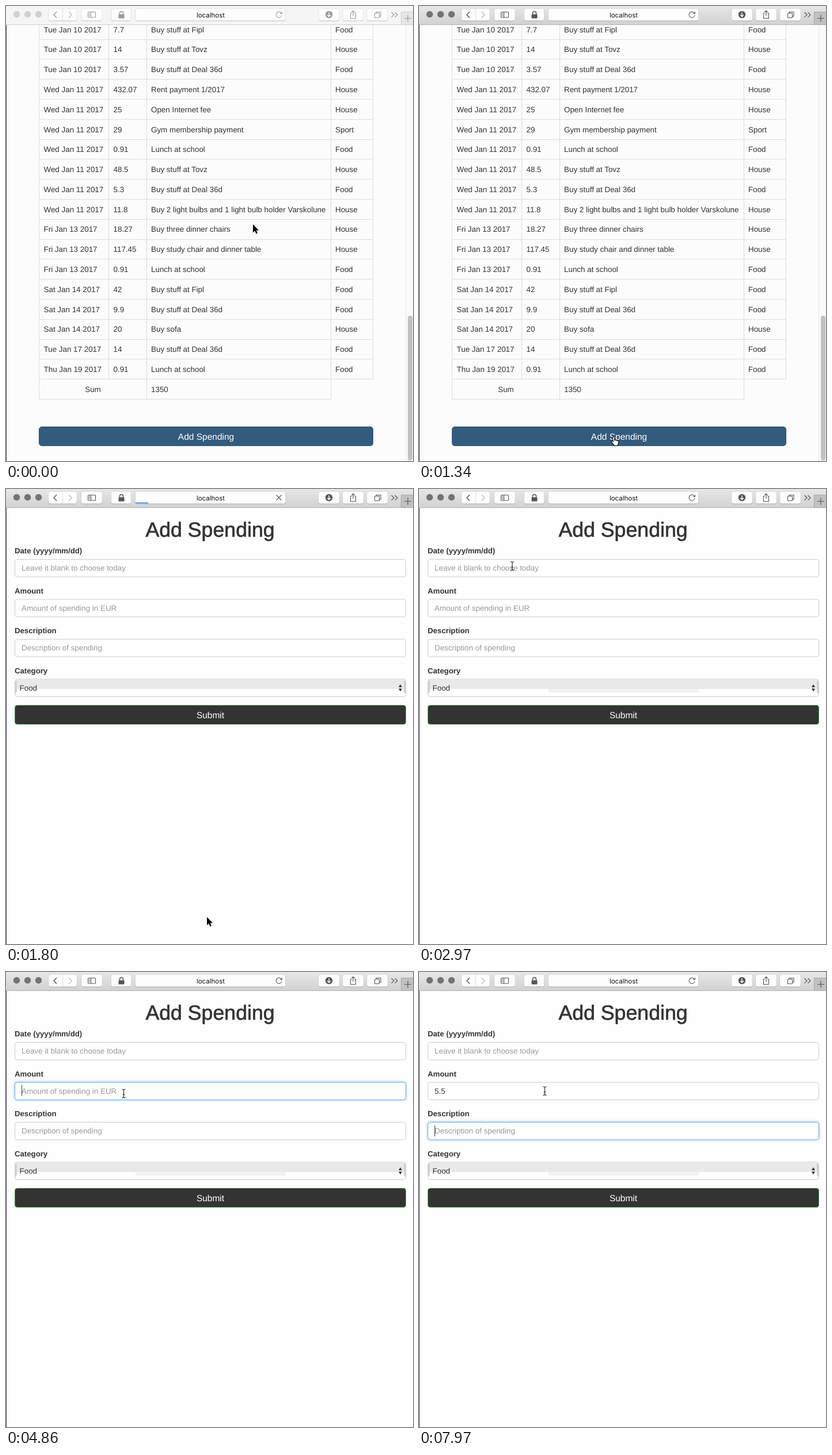
An HTML page that plays this animation: 707x792 px, repeating every 8 s.

```html
<!DOCTYPE html>
<html lang="en">
<head>
<meta charset="utf-8">
<title>Add Spending</title>
<style>
  html, body { margin: 0; width: 100%; height: 100%; overflow: hidden; background: #fefefe; }
  svg { display: block; }
  text { font: 13.4px "Liberation Sans", Arial, sans-serif; fill: #333; text-rendering: geometricPrecision; white-space: pre; }
  .mid { text-anchor: middle; }
  .label { font-weight: bold; font-size: 13.2px; }
  .hint { fill: #999; }
  .big { font-size: 15.5px; fill: #fff; }
  .title { font-size: 35.7px; stroke: #333; stroke-width: .7; }
  .url { font: 11.5px Inter, Roboto, sans-serif; fill: #111; }
  .icon { fill: none; stroke: currentColor; stroke-width: 1.1; }
  .solid { fill: currentColor; stroke: none; }
</style>
</head>
<body>
<svg id="stage" width="707" height="792" viewBox="0 0 707 792">
  <defs>
    <linearGradient id="bar" x2="0" y2="1"><stop stop-color="#e7e7e7"/><stop offset="1" stop-color="#d1d1d1"/></linearGradient>
    <filter id="blur" x="-5%" width="110%" y="-60%" height="220%"><feGaussianBlur stdDeviation="2.6"/></filter>
  </defs>
  <g id="tablePage"></g>
  <g id="formPage"></g>
  <rect y="33" width="1" height="759" fill="#3a4152"/>
  <g id="toolbar"></g>
  <g id="pointer">
    <path id="arrow" d="M0 0V14.2L3.3 11.2L5.6 16.6L8 15.6L5.7 10.4H10Z" fill="#000" stroke="#fff" stroke-width="1" paint-order="stroke"/>
    <path id="hand" d="M-1.6 1.2C-1.6 -.9 1 -.9 1.2 1L1.8 6C2.4 4.6 4.2 4.8 4.3 6.2C5 5.2 6.5 5.6 6.6 7C7.6 6.2 8.8 6.8 8.8 8.2C8.9 11 8.2 12 7.4 13.4V15.4H.6V13.8C-1 12.4 -2.6 10.4 -3.8 8.6C-4.4 7.2 -3 6.6 -1.9 7.4L-.8 8.4Z" fill="#fff" stroke="#111" stroke-width="1.1"/>
    <g id="beam" fill="none">
      <path id="beamLine" d="M-3 -7.5Q0 -7.5 0 -5.5Q0 -7.5 3 -7.5M0 -6V6M-3 7.5Q0 7.5 0 5.5Q0 7.5 3 7.5M-2 2H2" stroke="#222" stroke-width="1.1"/>
    </g>
  </g>
</svg>
<script>
const LOOP = 8000;
const $ = id => document.getElementById(id);
const rect = (x, y, w, h, attrs) => `<rect x="${x}" y="${y}" width="${w}" height="${h}" ${attrs}/>`;
const text = (x, y, str, cls = '', id = '') => `<text x="${x}" y="${y}" class="${cls}" id="${id}">${str}</text>`;
const path = (d, attrs) => `<path d="${d}" ${attrs}/>`;

const deal = 'Buy stuff at Deal 36d', lunch = 'Lunch at school';
const spendings = [
  ['Tue Jan 10', '7.7', 'Buy stuff at Fipl', 'Food'],
  ['Tue Jan 10', '14', 'Buy stuff at Tovz', 'House'],
  ['Tue Jan 10', '3.57', deal, 'Food'],
  ['Wed Jan 11', '432.07', 'Rent payment 1/2017', 'House'],
  ['Wed Jan 11', '25', 'Open Internet fee', 'House'],
  ['Wed Jan 11', '29', 'Gym membership payment', 'Sport'],
  ['Wed Jan 11', '0.91', lunch, 'Food'],
  ['Wed Jan 11', '48.5', 'Buy stuff at Tovz', 'House'],
  ['Wed Jan 11', '5.3', deal, 'Food'],
  ['Wed Jan 11', '11.8', 'Buy 2 light bulbs and 1 light bulb holder Varskolune', 'House'],
  ['Fri Jan 13', '18.27', 'Buy three dinner chairs', 'House'],
  ['Fri Jan 13', '117.45', 'Buy study chair and dinner table', 'House'],
  ['Fri Jan 13', '0.91', lunch, 'Food'],
  ['Sat Jan 14', '42', 'Buy stuff at Fipl', 'Food'],
  ['Sat Jan 14', '9.9', deal, 'Food'],
  ['Sat Jan 14', '20', 'Buy sofa', 'House'],
  ['Tue Jan 17', '14', deal, 'Food'],
  ['Thu Jan 19', '0.91', lunch, 'Food']
];

function buildTable() {
  const columns = [65.5, 186.5, 252, 572];
  let grid = 'M57.5 33V684.5M178.5 33V649.5M244.5 33V684.5M564.5 33V684.5M637.5 33V649.5M57 684.5H565';
  let cells = '';
  spendings.forEach(([day, ...rest], i) => {
    grid += `M57 ${Math.floor(58 + 34.8 * i) + .5}H638`;
    [day + ' 2017', ...rest].forEach((str, c) => cells += text(columns[c], 45.6 + 34.78 * i, str));
  });
  $('tablePage').innerHTML =
    rect(0, 33, 707, 759, 'fill="#fcfcfc"') +
    path(grid, 'fill="none" stroke="#ddd"') + cells +
    text(151, 671.7, 'Sum', 'mid') + text(252, 671.7, '1350') +
    rect(57.5, 732.5, 580, 33, 'rx="4.5" id="addButton" stroke="#2b557a"') +
    text(347.5, 754.5, 'Add Spending', 'mid big') +
    rect(694.5, 33, 13, 759, 'fill="#fafafa" stroke="#e6e6e6"') +
    rect(698, 539, 8, 252, 'rx="4" fill="#c1c1c1"');
}

function buildForm() {
  const field = (id, y, label, hint) =>
    text(15, y - 10, label, 'label') +
    rect(15, y, 680, 31, `rx="4" fill="#66afe9" filter="url(#blur)" id="${id}Glow"`) +
    rect(15.5, y + .5, 679, 30.5, `rx="4" fill="#fff" id="${id}Box" stroke="#ccc"`) +
    text(27, y + 20, hint, 'hint', id + 'Text');
  $('formPage').innerHTML =
    rect(0, 33, 707, 759, 'fill="#fefefe"') +
    text(354.5, 83, 'Add Spending', 'mid title') +
    field('date', 122, 'Date (yyyy/mm/dd)', 'Leave it blank to choose today') +
    field('amount', 191.5, 'Amount', 'Amount of spending in EUR') +
    field('description', 261, 'Description', 'Description of spending') +
    text(15, 320.7, 'Category', 'label') +
    rect(15.5, 331, 679, 30.5, 'rx="4" fill="#fff" stroke="#ccc"') +
    rect(16, 331.5, 678, 16.5, 'rx="3" fill="#e9e9e9"') +
    path('M16 335V357L19 353V333ZM694 335V357L691 353V333Z', 'fill="#d2d2d2"') +
    rect(225, 348, 261, 6.5, 'fill="#f2f2f2" id="band"') +
    text(23.5, 351, 'Food') +
    path('M682 345L685 340L688 345ZM682 347.5L685 352.5L688 347.5Z', 'fill="#333"') +
    rect(15.5, 376.5, 679, 33, 'rx="4" fill="#333" stroke="#439a43"') +
    text(355, 399, 'Submit', 'mid big') +
    rect(27, 197, 1, 19, 'fill="#333" id="caret"');
}

function buildToolbar() {
  const buttons = [[74, 49], [131, 36], [182.5, 35], [224.5, 261], [543, 36], [585, 36], [627, 36]];
  const lights = [18.5, 37.5, 56.5].map(x => `<circle cx="${x}" cy="14.5" r="5.7" class="light"/>`).join('');
  $('toolbar').innerHTML =
    rect(0, 0, 707, 33, 'id="barFill"') + rect(0, 32, 707, 1, 'id="barEdge"') + lights +
    buttons.map(([x, w]) =>
      rect(x, 5, w, 21.6, 'rx="3.5" fill="#000" opacity=".16"') +
      rect(x, 4.5, w, 21, 'rx="3.5" fill="#fdfdfd" stroke="#000" stroke-opacity=".12" stroke-width=".6"')).join('') +
    path('M98.5 5V25.5', 'stroke="#ddd"') +
    path('M109 10L114 15.3L109 20.5', 'fill="none" stroke="#bbb" stroke-width="1.3"') +
    rect(686.5, 10.5, 22, 22, 'id="newTab"') +
    `<g class="icon">` +
    path('M88 10L83 15.3L88 20.5', 'stroke-width="1.4"') +
    rect(142.5, 10.5, 13, 9.5, 'rx="1"') + path('M147.5 10.5V20M144 13H146M144 15H146M144 17H146', '') +
    path('M197.5 15V12.5A3 3 0 0 1 203.5 12.5V15', 'stroke-width="1.5"') + rect(195.5, 14.5, 10, 7, 'rx="1" class="solid"') +
    `<circle cx="561" cy="15" r="6.2" class="solid"/>` +
    path('M561 11V18M558 15.5L561 18.5L564 15.5', 'stroke="#fff" stroke-width="1.4"') +
    path('M600.5 12.5H598.5V21.5H607.5V12.5H605.5M603 17V8.5M600.3 11L603 8.3L605.7 11', '') +
    rect(640.5, 12.5, 8, 8, 'rx="1"') + path('M643 12V10.5H651V18H649', '') +
    path('M669.5 11L674 15.3L669.5 19.6M675.5 11L680 15.3L675.5 19.6', 'stroke-width="1.2"') +
    path('M692 21.5H704M698 15.5V27.5', 'stroke-width="1.2"') +
    path('M478.6 13A5 5 0 1 0 479 16M479.3 9.8V13.3H475.8', 'id="reload"') +
    path('M469.5 10.5L478.5 19.5M478.5 10.5L469.5 19.5', 'id="stop"') + `</g>` +
    text(355.5, 19.6, 'localhost', 'mid url') +
    rect(225, 23.3, 22, 2, 'fill="#4c9bf5" id="progress"');
}

const clamp = v => Math.min(1, Math.max(0, v));
const ease = v => v * v * (3 - 2 * v);
const show = (id, on) => $(id).setAttribute('display', on ? 'inline' : 'none');
const set = (id, name, value) => $(id).setAttribute(name, value);

// Pointer stops: time, x, y
const route = [
  [0, 429, 380], [60, 429, 380], [240, 436, 430], [560, 385, 640], [840, 338, 750],
  [1680, 338, 750], [1800, 349, 745], [1950, 325, 640], [2250, 180, 310], [2460, 128, 193],
  [2620, 140, 148], [2760, 153, 120], [2970, 162, 134],
  [3270, 162, 134], [3560, 170, 208], [3860, 170, 208], [4250, 204.5, 211.5],
  [5040, 204.5, 211.5], [5280, 208, 211], [5510, 208, 211], [5800, 213, 208],
  [7090, 213, 208], [7270, 218.5, 207], [LOOP, 218.5, 207]
];

function along(points, t) {
  const i = Math.max(1, points.findIndex(p => p[0] > t));
  const [a, b] = [points[i - 1], points[i]];
  const k = ease(clamp((t - a[0]) / (b[0] - a[0])));
  return [a[1] + (b[1] - a[1]) * k, a[2] + (b[2] - a[2]) * k];
}

const inside = (v, lo, hi) => v >= lo && v < hi;
const PAGE_SWAP = 1740, FOCUS_AMOUNT = 3860, FOCUS_DESCRIPTION = 7640;
const typing = [[5860, '5'], [6620, '5.'], [7090, '5.5']];
const caretTimes = [[3860, 4330], [4860, 5330], [5860, 6140], [6680, 7180], [7270, 7450], [7640, LOOP]];

function focusField(id, amount) {
  const mix = (a, b) => Math.round(a + (b - a) * amount);
  set(id + 'Glow', 'opacity', .75 * amount);
  set(id + 'Box', 'stroke', `rgb(${mix(204, 102)},${mix(204, 175)},${mix(204, 233)})`);
}

function drawPointer(t, onForm) {
  const [x, y] = along(route, t);
  const overField = onForm && (inside(y, 112, 153) || inside(y, 191, 223) || inside(y, 261, 293));
  const overButton = onForm ? inside(y, 376, 410) : y >= 732;
  set('pointer', 'transform', `translate(${x} ${y})`);
  show('beam', overField);
  show('hand', overButton);
  show('arrow', !overField && !overButton);
}

function drawToolbar(t) {
  const active = t >= 900;
  const loading = inside(t, 1680, 2300);
  set('barFill', 'fill', active ? 'url(#bar)' : '#f5f5f5');
  set('barEdge', 'fill', active ? '#b2b2b2' : '#d2d2d2');
  set('newTab', 'fill', active ? '#c1c1c1' : '#e6e6e6');
  set('newTab', 'stroke', active ? '#a9a9a9' : '#d0d0d0');
  set('toolbar', 'color', active ? '#555' : '#999');
  document.querySelectorAll('.light').forEach(c => c.setAttribute('fill', active ? '#737373' : '#d0d0d0'));
  show('reload', !loading);
  show('stop', loading);
  show('progress', loading);
  set('progress', 'width', 14 + 8 * clamp((t - 1680) / 100) + 239 * ease(clamp((t - 2060) / 200)));
}

function drawForm(t) {
  const toAmount = ease(clamp((t - FOCUS_AMOUNT) / 150));
  const toDescription = ease(clamp((t - FOCUS_DESCRIPTION) / 150));
  focusField('date', 0);
  focusField('amount', toAmount - toDescription);
  focusField('description', toDescription);

  const typed = typing.filter(([at]) => t >= at).map(([, str]) => str).pop() || '';
  $('amountText').textContent = typed || 'Amount of spending in EUR';
  set('amountText', 'class', typed ? '' : 'hint');

  const inDescription = t >= FOCUS_DESCRIPTION;
  const offset = inDescription ? 0 : [0, 7.5, 11.2, 18.6][typed.length];
  set('caret', 'x', 27 + Math.round(offset));
  set('caret', 'y', inDescription ? 267 : 197);
  show('caret', caretTimes.some(([on, off]) => inside(t, on, off)));
  show('band', t >= 2300);
}

function render(t) {
  const onForm = t >= PAGE_SWAP;
  show('tablePage', !onForm);
  show('formPage', onForm);
  set('addButton', 'fill', inside(t, 1400, 1510) ? '#2a4f70' : '#335b7d');
  drawToolbar(t);
  drawForm(t);
  drawPointer(t, onForm);
}

buildTable();
buildForm();
buildToolbar();
const start = performance.now();
function tick() {
  render((performance.now() - start) % LOOP);
  requestAnimationFrame(tick);
}
tick();
</script>
</body>
</html>
```
